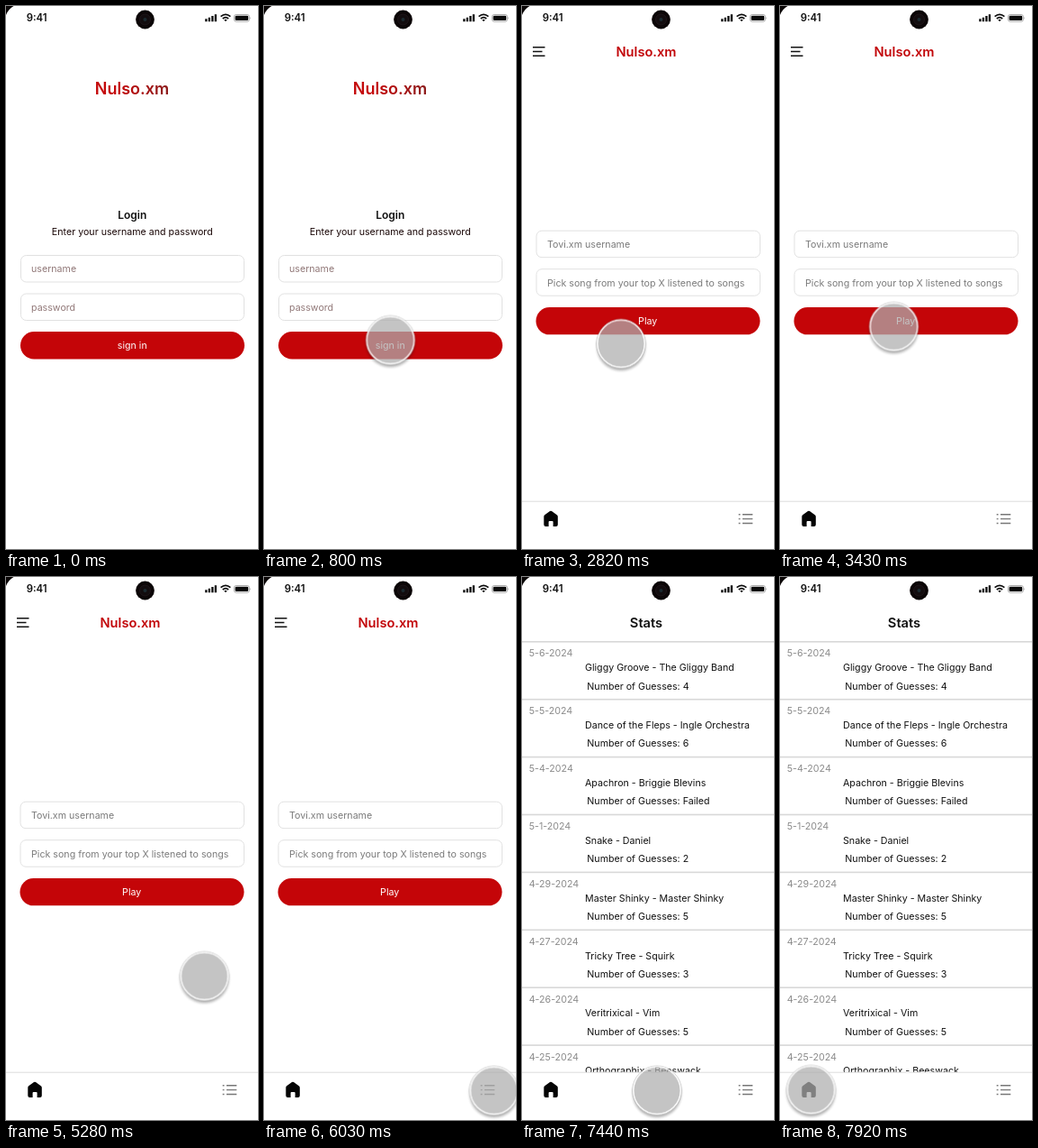
These frames come from a looping animation (280 px wide and 602 px high, 7.99 s). An HTML page:

```html
<!DOCTYPE html>
<html lang="en">
<head>
<meta charset="utf-8">
<title>Song guessing app</title>
<style>
  html, body { margin: 0; width: 100%; height: 100%; overflow: hidden; background: #fff; }
  svg { display: block; width: 100%; height: 100%; }
  text { font: 400 10.67px Inter, "Liberation Sans", sans-serif; fill: #111; }
  .mid { text-anchor: middle; }
  .bold { font-weight: 600; }
  .brand { fill: #c20609; }
  .field { fill: #fff; stroke: #e1e1e1; }
  .button { fill: #c40508; }
  .label { fill: #fff; }
  .hint { fill: #7b7b7b; }
  #login text:not([class]) { fill: #1a0707; }
  #login .hint { fill: #917878; }
  .date { fill: #8b8b8b; }
  .rule { fill: #d8d8d8; }

  #login, #home, #stats, #nav, #cursor, #dot { animation: 7.99s infinite; }
  #login, #home, #stats, #nav { animation-timing-function: step-end; }
  #login { animation-name: login; }
  #home { animation-name: home; }
  #stats { animation-name: stats; }
  #nav { animation-name: nav; }
  #cursor { animation-name: move; animation-timing-function: linear; }
  #dot { animation-name: tap; animation-timing-function: linear; }

  @keyframes login { 0% { opacity: 1 } 26.9%, 100% { opacity: 0 } }
  @keyframes home { 0% { opacity: 0 } 26.9% { opacity: 1 } 79.8%, 100% { opacity: 0 } }
  @keyframes stats { 0% { opacity: 0 } 79.8%, 100% { opacity: 1 } }
  @keyframes nav { 0% { opacity: 0 } 26.9%, 100% { opacity: 1 } }

  @keyframes move {
    0%, 4.63% { transform: translate(310px, 660px); }
    4.87% { transform: translate(269px, 586px); }
    5.76% { transform: translate(234px, 527px); }
    6.63% { transform: translate(181px, 438px); }
    7.51% { transform: translate(153px, 392px); animation-timing-function: ease-out; }
    10%, 12.02% { transform: translate(140.5px, 370.5px); animation-timing-function: cubic-bezier(.3, .3, .3, 1); }
    16.77%, 34.92% { transform: translate(109.5px, 375px); animation-timing-function: cubic-bezier(.35, .2, .4, 1); }
    42.9% { transform: translate(126.5px, 355.5px); animation-timing-function: step-end; }
    66.07% { transform: translate(220.5px, 442.5px); animation-timing-function: step-end; }
    66.95%, 69.84% { transform: translate(254.5px, 524px); animation-timing-function: cubic-bezier(.35, .2, .4, 1); }
    76.3%, 90.11% { transform: translate(255.5px, 570px); animation-timing-function: cubic-bezier(.35, .2, .35, 1); }
    99.1%, 100% { transform: translate(34.5px, 568.5px); }
  }

  @keyframes tap {
    0% { opacity: 0; transform: none; animation-timing-function: step-end; }
    25.9%, 26.9% { opacity: .95; transform: none; }
    28.6% { opacity: 0; transform: scale(.5); animation-timing-function: step-end; }
    78.84%, 79.8% { opacity: .95; transform: none; }
    81.6%, 100% { opacity: 0; transform: scale(.5); }
  }
</style>
</head>
<body>
<svg viewBox="0 0 280 602" preserveAspectRatio="none">
  <defs>
    <linearGradient id="fade">
      <stop offset=".3" stop-color="#c4080a"/>
      <stop offset="1" stop-color="#8c1c1c"/>
    </linearGradient>
    <filter id="soft" x="-30%" y="-30%" width="160%" height="160%">
      <feGaussianBlur stdDeviation="1.8"/>
    </filter>
    <mask id="ring" maskUnits="userSpaceOnUse" x="-40" y="-40" width="80" height="80">
      <rect x="-40" y="-40" width="80" height="80" fill="#fff"/>
      <circle r="27" fill="#000"/>
    </mask>
  </defs>
  <rect width="280" height="602" fill="#fff"/>

  <g id="login">
    <text class="mid bold" x="140" y="98" style="font-size:18px;fill:url(#fade)">Nulso.xm</text>
    <text class="mid bold" x="140.3" y="235.5" style="font-size:12px">Login</text>
    <text class="mid" x="140.3" y="254" style="fill:#1a0707">Enter your username and password</text>
    <rect class="field" x="16.5" y="276.5" width="248" height="29.5" rx="6"/>
    <text class="hint" x="28" y="295">username</text>
    <rect class="field" x="16.5" y="319" width="248" height="29.5" rx="6"/>
    <text class="hint" x="28" y="337.5">password</text>
    <rect class="button" x="16" y="361" width="249" height="30.5" rx="15.2"/>
    <text class="mid label" x="140.3" y="380">sign in</text>
  </g>

  <g id="home">
    <path d="M12 45.7H25.5M12 50.5H22.5M12 55.3H25.5" stroke="#111" stroke-width="1.5"/>
    <text class="mid bold brand" x="138" y="56" style="font-size:14.67px">Nulso.xm</text>
    <rect class="field" x="16" y="249.2" width="248.5" height="29.5" rx="6"/>
    <text class="hint" x="28" y="268">Tovi.xm username</text>
    <rect class="field" x="16" y="291.7" width="248.5" height="29.5" rx="6"/>
    <text class="hint" x="28" y="310.5">Pick song from your top X listened to songs</text>
    <rect class="button" x="15.5" y="334" width="249" height="30.3" rx="15.1"/>
    <text class="mid label" x="139.7" y="353">Play</text>
  </g>

  <g id="stats">
    <text class="mid bold" x="138" y="55.5" style="font-size:14.67px">Stats</text>
    <g id="rows"></g>
  </g>

  <g id="nav">
    <rect y="549" width="280" height="53" fill="#fff"/>
    <rect y="548.7" width="280" height="1" fill="#dcdcdc"/>
    <path d="M24.3 566.2Q24.3 565 25.2 564.3L31 560Q32 559.3 33 560L38.8 564.3Q39.8 565 39.8 566.2V575Q39.8 577 37.8 577H34.6V572Q34.6 571 33.6 571H30.6Q29.6 571 29.6 572V577H26.3Q24.3 577 24.3 575Z" fill="#050505"/>
    <path d="M240.7 563.7H242.5M240.7 568.6H242.5M240.7 573.5H242.5M245 563.7H256.3M245 568.6H256.3M245 573.5H256.3" stroke="#777" stroke-width="1.4"/>
  </g>

  <g id="status">
    <path d="M0 0H8.5Q2.5 3.5 0 10Z" fill="#0a0606"/>
    <text class="bold" x="22.7" y="17.3" style="font-size:11.4px">9:41</text>
    <circle cx="154.5" cy="15" r="10.4" fill="#0b0506"/>
    <circle cx="154.5" cy="15" r="6" fill="#120c0e" stroke="#231a1e" stroke-width=".8"/>
    <circle cx="154.5" cy="15" r="2" fill="#1b2a30"/>
    <path d="M222.4 17.2V14.2M225.9 17.2V12.8M229.4 17.2V11M232.9 17.2V9.2" stroke="#0a0a0a" stroke-width="2.3"/>
    <g fill="none" stroke="#0a0a0a" stroke-width="1.7">
      <path d="M238.6 11.7Q244 6.9 249.4 11.7M240.8 14Q244 11.2 247.2 14"/>
      <path d="M242.3 15.3Q244 14 245.7 15.3L244 17.2Z" fill="#0a0a0a" stroke="none"/>
    </g>
    <rect x="253.4" y="9.5" width="17" height="7.8" rx="2.4" fill="none" stroke="#9a9a9a" stroke-width=".8"/>
    <rect x="254.6" y="10.7" width="14.6" height="5.4" rx="1.4" fill="#0a0a0a"/>
    <path d="M271.3 12Q272.6 13.4 271.3 14.8Z" fill="#9a9a9a"/>
  </g>

  <g id="cursor">
    <g mask="url(#ring)"><circle cy="2.8" r="27" fill="#000" opacity=".32" filter="url(#soft)"/></g>
    <circle r="26" fill="rgba(174,174,174,.73)"/>
    <circle r="27.1" fill="none" stroke="#a9a9a9" stroke-width=".7"/>
    <circle r="26.2" fill="none" stroke="#fff" stroke-width="1.3"/>
    <circle id="dot" cy="-.8" r="15.3" fill="#dac142"/>
  </g>
</svg>
<script>
  const songs = [
    ["5-6", "Gliggy Groove - The Gliggy Band", 4],
    ["5-5", "Dance of the Fleps - Ingle Orchestra", 6],
    ["5-4", "Apachron - Briggie Blevins", "Failed"],
    ["5-1", "Snake - Daniel", 2],
    ["4-29", "Master Shinky - Master Shinky", 5],
    ["4-27", "Tricky Tree - Squirk", 3],
    ["4-26", "Veritrixical - Vim", 5],
    ["4-25", "Orthographix - Beeswack", 4]
  ];
  const pitch = 63.9;
  document.getElementById("rows").innerHTML = songs.map(([day, song, count], i) => `
    <g transform="translate(0 ${(71 + i * pitch).toFixed(1)})">
      <rect class="rule" width="280" height="1.6"/>
      <text class="date" x="7.7" y="17.3">${day}-2024</text>
      <text x="70" y="33">${song}</text>
      <text x="72.3" y="53.5">Number of Guesses: ${count}</text>
    </g>`).join("");
</script>
</body>
</html>
```
